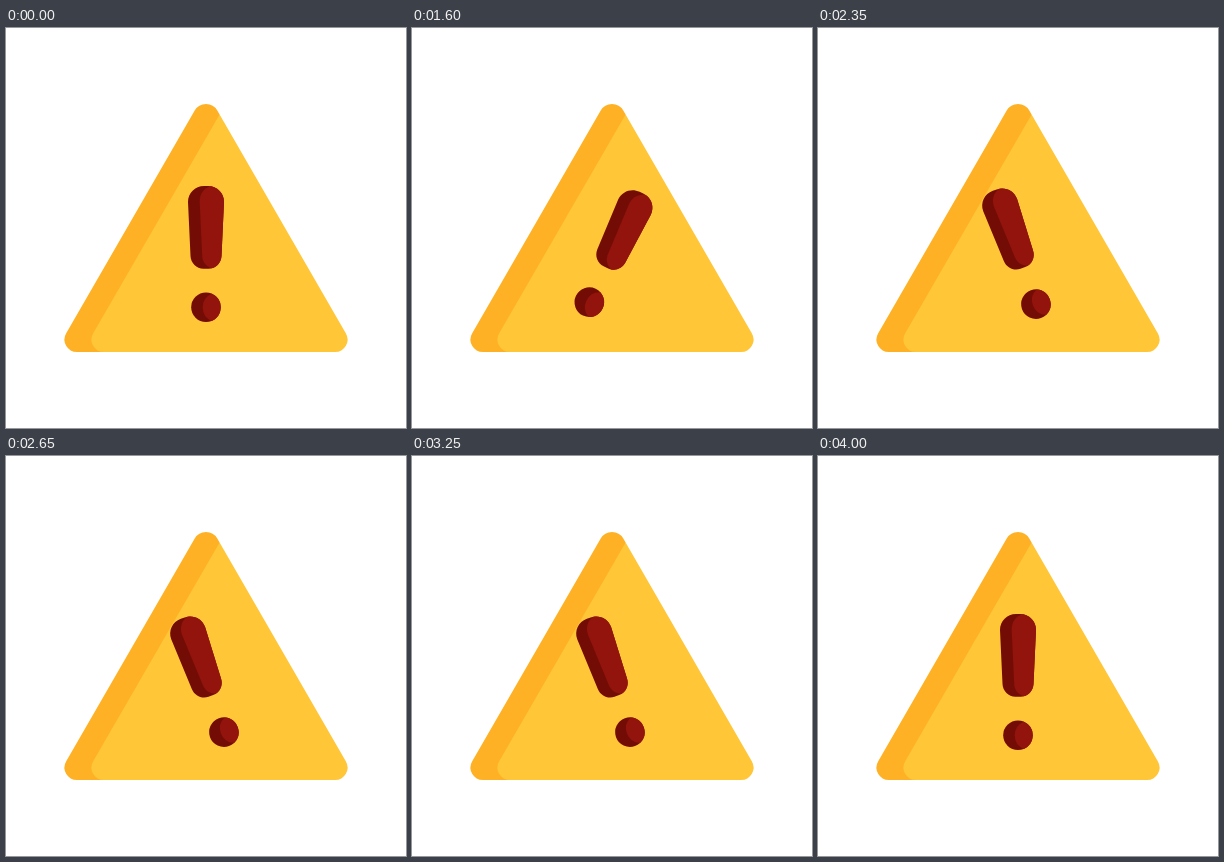
These frames come from a looping animation (400x400 px, 4030 ms). An HTML page without scripts:

```html
<!DOCTYPE html>
<html lang="en">
<head>
<meta charset="utf-8">
<title>Warning</title>
<style>
  /* --tick counts 30 ms steps; --grow eases the first swing in, --fade damps the last ones */
  @property --tick { syntax: "<number>"; inherits: false; initial-value: 6; }
  @property --grow { syntax: "<number>"; inherits: false; initial-value: 0; }
  @property --fade { syntax: "<number>"; inherits: false; initial-value: 1; }

  html, body { margin: 0; width: 100%; height: 100%; overflow: hidden; background: #fff; }
  svg { display: block; width: 100%; height: 100%; }

  .mark {
    --turn: calc((var(--tick) - 6.45) * 36deg);
    --wave: cos(var(--turn) + 15deg * (1 - cos(var(--turn))));
    --ramp: calc(var(--grow) * var(--grow) * (3 - 2 * var(--grow)));
    --damp: calc(var(--fade) * var(--fade));
    transform-box: view-box;
    transform-origin: 200px 226.5px;
    transform: rotate(calc(-28.8deg * var(--ramp) * var(--damp) * var(--wave)));
    animation: shake 4030ms infinite;
  }

  @keyframes shake {
    0% { --tick: 6; --grow: 0; --fade: 1; animation-timing-function: step-end; }
    25.55% { --tick: 6; --grow: 0.1667; --fade: 1; animation-timing-function: steps(5, end); }
    29.27% { --tick: 6; --grow: 1; --fade: 1; animation-timing-function: steps(74, end); }
    84.36% { --tick: 80; --grow: 1; --fade: 1; animation-timing-function: steps(20, end); }
    99.25%, 100% { --tick: 100; --grow: 1; --fade: 0; }
  }

  .amber { fill: #ffb125; }
  .yellow { fill: #ffc638; }
  .dark { fill: #740c06; }
  .red { fill: #92140d; }
</style>
</head>
<body>
<svg viewBox="0 0 400 400" role="img" aria-label="Warning sign">
  <path class="amber" d="M188.7 82.5A13 13 0 0 1 211.3 82.5L213.6 86.5L214 96L110 324H71A12.5 12.5 0 0 1 60.2 305.2Z"/>
  <path class="yellow" d="M213.6 86.5L339.8 305.2A12.5 12.5 0 0 1 329 324H98A12.5 12.5 0 0 1 87.2 305.2Z"/>
  <g class="mark">
    <path class="dark" d="M198 158h4c9 0 16 7 16 16L215.5 228c-.3 7-6 12.7-13 12.7h-5c-7 0-12.7-5.7-13-12.7L182 174c0-9 7-16 16-16z"/>
    <path class="red" d="M205 158.3c7.5 1.4 13 7.7 13 15.7L215.5 228c-.3 6-4.3 11-9.8 12.3c-5.4-1.5-9.2-6.3-9.5-12.3L193.7 174c-.2-8 4.3-14.2 11.3-15.7z"/>
    <circle class="dark" cx="200" cy="279.3" r="14.8"/>
    <path class="red" d="M205.7 265.7a14.8 14.8 0 0 1 0 27.2a14.8 14.8 0 0 1 0-27.2z"/>
  </g>
</svg>
</body>
</html>
```
